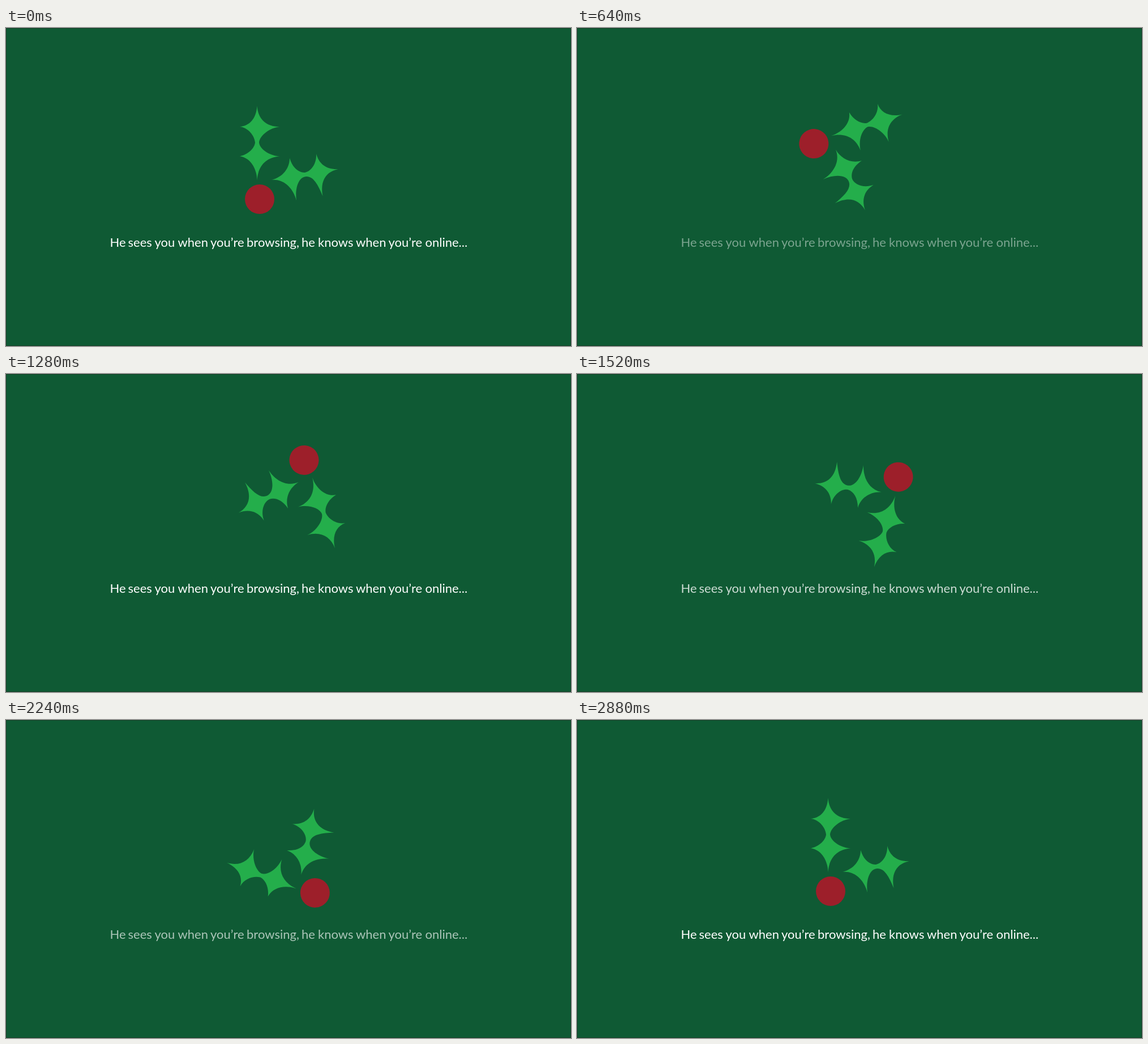
Write an HTML page that moves like this. It is 998x561 px and loops after 2960 ms.

```html
<!DOCTYPE html>
<html lang="en">
<head>
<meta charset="utf-8">
<title>Holly</title>
<style>
  html, body { margin: 0; width: 100%; height: 100%; overflow: hidden; background: #0f5a34; }
  svg { display: block; width: 100%; height: 100%; }
  text { font: 400 22px Lato, "Open Sans", sans-serif; fill: #fff; }
</style>
</head>
<body>
<svg viewBox="0 0 998 561">
  <rect x=".5" y=".5" width="997" height="560" fill="#0f5a34" stroke="#173f28"/>
  <g id="holly">
    <g fill="#24ae4b">
      <path d="M443.5 137.500C445 160 459 174 483 174.300C466 176 448 190 447 202
        C448 213 464 225 483 226.500C459 228 445 244 443.500 268.500
        C443 248 432 229 413 226.300C428 223 439 212 440 202
        C439 190 428 176 413 174C430 173 442 160 443.500 137.500Z"/>
      <path d="M469 268C486 264 501 250 501 229.500C506 246 516 255 527 255
        C538 254 549 240 548 222C553 240 566 250 586.500 249
        C567 253 554 268 559.500 296.500C551 276 543 262 531 262
        C517 262 510 282 513 304.500C508 285 493 266 469 268Z"/>
    </g>
    <circle cx="448" cy="302" r="26" fill="#9d1f2a"/>
  </g>
  <text id="line" y="386"></text>
</svg>
<script>
  const STEP = 80, STEPS = 37;
  const words = "He sees you when you’re browsing, he knows when you’re online...".split(" ");
  const starts = [183.5, 215.5, 262.5, 303.5, 361, 425, 522, 551, 618, 675.5, 740.5];

  // [step, value] pairs, linear in between
  const turn = [[0, 0], [8, 73.3], [16, 162.2], [24, 254], [35, 354], [36, 360]];
  const fade = [[0, 1], [8, .45], [16, 1], [24, .45], [35, 1], [36, 1]];

  const holly = document.getElementById("holly");
  const line = document.getElementById("line");

  words.forEach((word, i) => {
    const span = document.createElementNS(line.namespaceURI, "tspan");
    span.setAttribute("x", starts[i]);
    span.textContent = word;
    line.append(span);
  });

  function valueAt(keys, step) {
    const i = Math.max(1, keys.findIndex(key => key[0] >= step));
    const [s0, v0] = keys[i - 1], [s1, v1] = keys[i];
    return v0 + (v1 - v0) * (step - s0) / (s1 - s0);
  }

  function draw(ms) {
    const step = Math.floor(ms / STEP) % STEPS;
    holly.setAttribute("transform", `rotate(${valueAt(turn, step)} 499 233.1)`);
    line.setAttribute("opacity", valueAt(fade, step));
  }

  let begin;
  function tick(now) {
    begin ??= now;
    draw(Math.max(0, now - begin));
    requestAnimationFrame(tick);
  }
  draw(0);
  requestAnimationFrame(tick);
</script>
</body>
</html>
```
